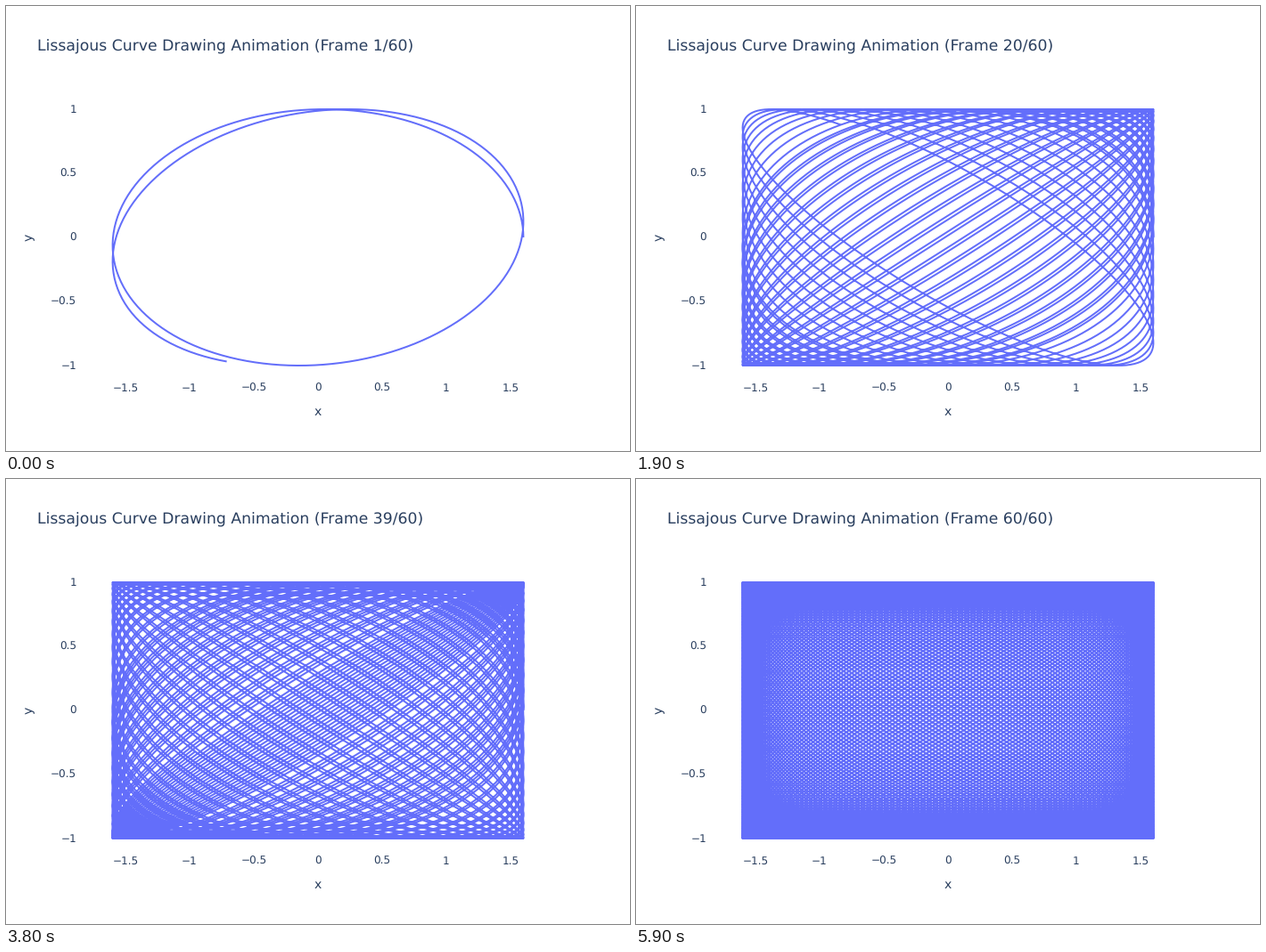
Animation of 700 by 500 pixels, one loop 6 s. Source, as a matplotlib script:

```python
import numpy as np
import matplotlib.pyplot as plt
from matplotlib.animation import FuncAnimation

W, H, DPI = 700, 500, 100
FRAMES, INTERVAL = 60, 100
POINTS_PER_FRAME = 250
CX, CY, UNIT = 350, 260, 144  # centre of the plot and pixels per data unit
INK, LINE = "#2a3f5f", "#636efa"

plt.rcParams["font.family"] = "DejaVu Sans"
plt.rcParams["text.hinting"] = "none"


def pt(px):
    return px * 72 / DPI


def label(x, y, text, size, **kw):
    kw.setdefault("va", "baseline")
    return ax.text(x, y, text, fontsize=pt(size), color=INK, **kw)


def tick_text(v):
    return f"{v:g}".replace("-", "\u2212")


fig = plt.figure(figsize=(W / DPI, H / DPI), dpi=DPI, facecolor="white")
ax = fig.add_axes([0, 0, 1, 1])
ax.set_xlim(0, W)
ax.set_ylim(H, 0)
ax.axis("off")

for v in np.arange(-1.5, 1.6, 0.5):
    label(CX + UNIT * v, 433, tick_text(v), 12, ha="center")
for v in np.arange(-1, 1.1, 0.5):
    label(79, CY - UNIT * v + 4, tick_text(v), 12, ha="right")
label(CX, 460, "x", 14, ha="center")
label(31, CY, "y", 14, ha="right", va="center", rotation=90,
      rotation_mode="default").set_x(33)
title = label(35, 50, "", 17.27, ha="left")

# Closed Lissajous figure, traced exactly once per loop
t = np.linspace(0, 2 * np.pi, FRAMES * POINTS_PER_FRAME)
xs = CX + UNIT * 1.6 * np.cos(101 * t)
ys = CY - UNIT * np.sin(103 * t)
curve, = ax.plot([], [], color=LINE, lw=pt(2), solid_capstyle="butt",
                 solid_joinstyle="round", snap=False)


def draw(i):
    n = (i + 1) * POINTS_PER_FRAME
    curve.set_data(xs[:n], ys[:n])
    title.set_text(f"Lissajous Curve Drawing Animation (Frame {i + 1}/{FRAMES})")
    return curve, title


anim = FuncAnimation(fig, draw, frames=FRAMES, interval=INTERVAL,
                     init_func=lambda: draw(0), repeat=True, repeat_delay=0)
plt.show()
```
